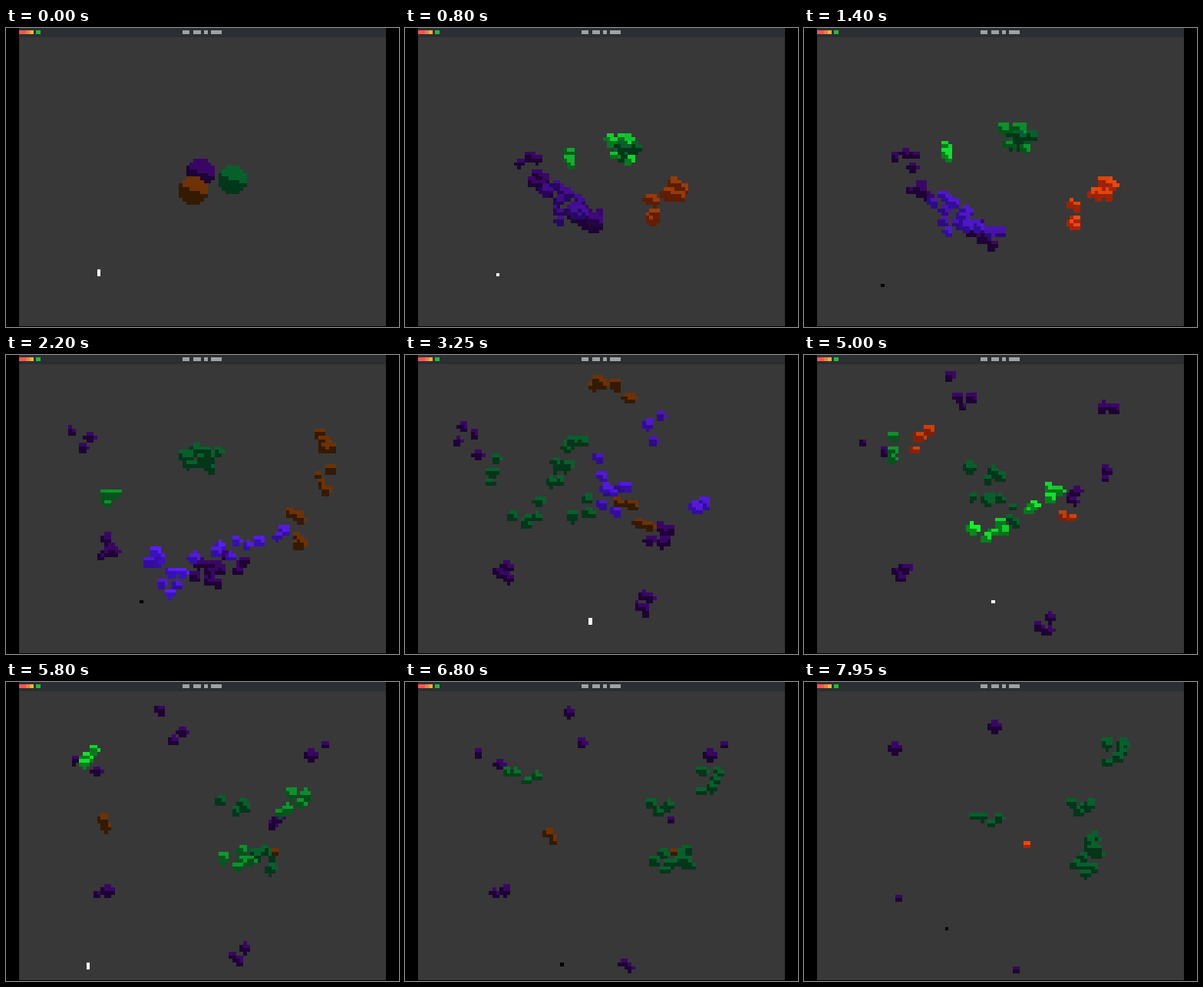
Write an HTML page with a canvas that moves like this. It is 512x389 px and loops after 8 s.

```html
<!DOCTYPE html>
<html lang="en">
<head>
<meta charset="utf-8">
<title>Particle swarm</title>
<style>
html, body { margin: 0; width: 100%; height: 100%; overflow: hidden; background: #000; }
canvas { display: block; width: 512px; height: 389px; }
</style>
</head>
<body>
<canvas id="stage" width="512" height="389"></canvas>
<script>
const LOOP = 8000, STEP = 50, CELL = 4.645, LEFT = 16.4, TOP = 12;
const TRAIL = 550, BALL = 4.1;
const BEATS = [0, 1400, 2200, 3250, 4250, 5800, 7950];
const ctx = document.getElementById('stage').getContext('2d');

const clamp = v => Math.max(0, Math.min(1, v));
const mix = (a, b, f) => a + (b - a) * f;
const noise = n => { const s = Math.sin(n * 127.1 + 3.7) * 43758.5453; return s - Math.floor(s); };

// Colours from resting to hot, lit side and shaded side; glow is the period of the heat.
const violet = { home: [51.1, 38], glow: 8000, lit: ['#3a0666', '#5a20ff'], shade: ['#1e0434', '#3a12c4'] };
const green = { home: [60.1, 40.1], glow: 4400, lit: ['#07602c', '#16f02c'], shade: ['#04361a', '#078a1c'] };
const orange = { home: [49.2, 43], glow: 3200, lit: ['#6e3205', '#ff4a10'], shade: ['#351a02', '#b82404'] };

// Every flock leaves its ball and visits one cell per beat, its members trailing the leader.
// It shrinks from count to left; hot is a time of greatest heat.
const flock = (kind, count, left, spread, hot, ...stops) =>
  ({ kind, count, left, spread, hot, path: [kind.home, ...stops] });

const flocks = [
  flock(violet, 4, 1, 4, null, [25, 34], [18, 18], [15, 23], [15, 24], [20, 20], [22, 16]),
  flock(violet, 5, 1, 2.5, null, [28, 44], [25, 55], [24, 59], [24, 60], [24, 58], [23, 58]),
  flock(violet, 11, 1, 6, 2400, [37, 49], [43, 58], [55, 29], [41, 7], [44, 8], [50, 10]),
  flock(violet, 9, 0, 3, null, [46, 55], [62, 55], [69, 46], [71, 36]),
  flock(violet, 8, 1, 2.5, null, [49, 57], [56, 60], [64, 68], [65, 72], [62, 74], [56, 78]),
  flock(violet, 5, 0, 2.5, 2600, [50, 54], [73, 46], [79, 38], [78, 38], [82, 18]),
  flock(violet, 4, 0, 2, 2200, [44, 54], [60, 50], [67, 15], [78, 12], [86, 15]),
  flock(green, 4, 4, 2.5, 1400, [36, 32], [24, 38], [22, 28], [24, 27], [21, 18], [51, 37]),
  flock(green, 9, 9, 3, null, [56, 28], [49, 26], [39, 31], [42, 36], [72, 48], [79, 43]),
  flock(green, 5, 5, 3, 5000, [57, 28], [49, 28], [28, 45], [41, 46], [64, 47], [76, 49]),
  flock(green, 5, 5, 3.5, 5000, [55, 28], [49, 28], [46, 45], [56, 42], [79, 31], [84, 17]),
  flock(green, 4, 4, 4, null, [56, 27], [50, 24], [41, 22], [40, 29], [62, 32], [74, 32]),
  flock(orange, 9, 1, 3, 1400, [83, 42], [85, 20], [50, 6], [36, 10], [25, 38], [59, 43]),
  flock(orange, 6, 0, 4, 1400, [74, 49], [79, 44], [59, 41], [72, 45])
];

// Smooth curve through the stops of a path; the first leg starts fast.
function along(path, time) {
  const last = path.length - 1;
  let k = 0;
  while (k < last && time >= BEATS[k + 1]) k++;
  if (k === last) return path[last];
  const span = BEATS[k + 1] - BEATS[k], u = (time - BEATS[k]) / span, u2 = u * u, u3 = u2 * u;
  const slope = (i, axis) => {
    const a = Math.max(0, i - 1), b = Math.min(last, i + 1);
    return (path[b][axis] - path[a][axis]) / (BEATS[b] - BEATS[a]) * (i ? .7 : 2);
  };
  return [0, 1].map(axis =>
    mix(path[k][axis], path[k + 1][axis], 3 * u2 - 2 * u3) +
    span * (slope(k, axis) * (u3 - 2 * u2 + u) + slope(k + 1, axis) * (u3 - u2)));
}

function ramp([cold, hot], heat) {
  const channel = n => {
    const at = color => parseInt(color.slice(n, n + 2), 16);
    return Math.round(mix(at(cold), at(hot), heat));
  };
  return `rgb(${channel(1)},${channel(3)},${channel(5)})`;
}

function rect(color, x, y, w, h) {
  ctx.fillStyle = color;
  ctx.fillRect(x, y, w, h);
}

function cell(x, y, color, tall = 1) {
  const l = Math.round(LEFT + x * CELL), t = Math.round(TOP + y * CELL);
  rect(color, l, t, Math.round(LEFT + (x + 1) * CELL) - l, Math.round(TOP + (y + tall) * CELL) - t);
}

function drawBlob(x, y, r, light, dark) {
  for (let j = Math.floor(y - r); j <= y + r; j++) {
    for (let i = Math.floor(x - r); i <= x + r; i++) {
      const dx = i + .5 - x, dy = j + .5 - y;
      if (dx * dx + dy * dy <= r * r) cell(i, j, dy < .4 * dx - .2 ? light : dark);
    }
  }
}

function drawFlock({ kind, count, left, spread, hot, path }, time, seed) {
  const whole = Math.exp(-time / 220);
  const thinning = (1 - clamp((time - 2500) / 5450)) ** 2;
  const alive = Math.ceil(mix(left, count, thinning));
  for (let i = 0; i < alive; i++) {
    const id = seed * 40 + i;
    const lag = TRAIL * i / count * clamp(time / 2200);
    const [x, y] = along(path, time - lag);
    const angle = noise(id) * 2 * Math.PI;
    const drift = alive > 1 ? spread * Math.sqrt(noise(id + .3)) * (1 - whole) : 0;
    const r = mix(1.2 + .6 * noise(id + .6), BALL, whole);
    const heat = hot === null ? 0
      : clamp(Math.cos(2 * Math.PI * (time - hot) / kind.glow)) * (1 - whole) * mix(.7, 1, noise(id + .8));
    drawBlob(x + drift * Math.cos(angle), y + drift * Math.sin(angle), r, ramp(kind.lit, heat), ramp(kind.shade, heat));
  }
}

function drawWindow() {
  rect('#000', 0, 0, 512, 389);
  rect('#383838', 17, 12, 478, 376);
  rect('#2b2f32', 17, 0, 478, 12);
  rect('#f4574f', 17, 3, 9, 5);
  rect('#ee7d4c', 26, 3, 5, 5);
  rect('#f0b040', 31, 3, 5, 5);
  rect('#28b83c', 39, 3, 6, 5);
  for (const [x, w] of [[230, 9], [244, 10], [258, 5], [267, 14]]) rect('#a0a1a3', x, 3, w, 5);
}

// The terminal caret hops about the lower left on every step.
function drawCaret(step) {
  const bright = noise(step + .3) > .5;
  cell(Math.floor(mix(18, 52, noise(step))), Math.floor(mix(64, 78, noise(step + .5))),
    bright ? '#fff' : '#000', bright && noise(step + .7) > .4 ? 2 : 1);
}

function draw(now) {
  const step = Math.floor(now % LOOP / STEP);
  drawWindow();
  flocks.forEach((f, seed) => drawFlock(f, step * STEP, seed));
  drawCaret(step);
}

const start = performance.now();
function tick() {
  draw(performance.now() - start);
  requestAnimationFrame(tick);
}
tick();
</script>
</body>
</html>
```
